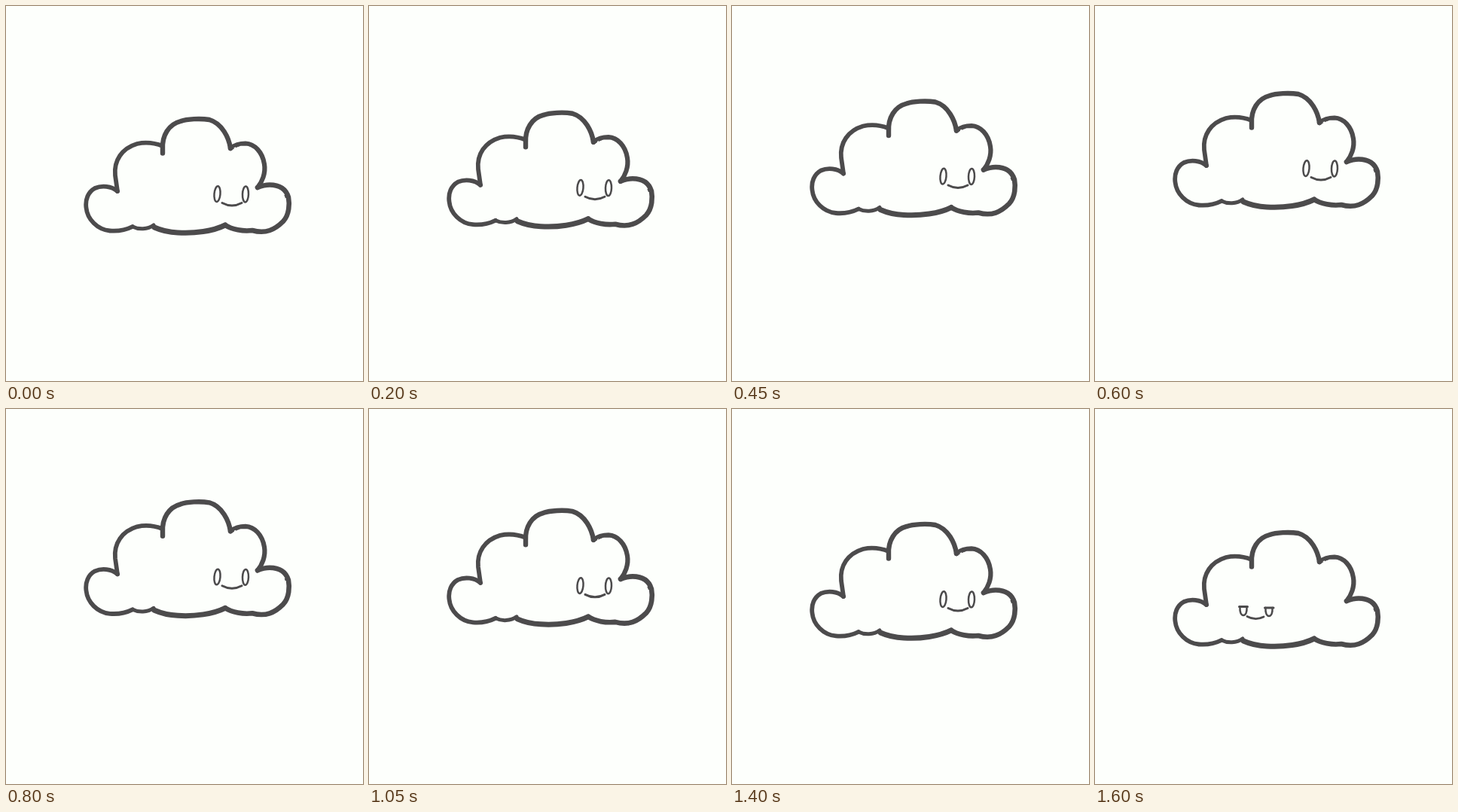
An HTML page that plays this animation: 474 px wide and 498 px high, repeating every 1.65 s.

```html
<!DOCTYPE html>
<html lang="en">
<head>
<meta charset="utf-8">
<title>Floating cloud</title>
<style>
  html, body { margin: 0; width: 100%; height: 100%; overflow: hidden; background: #fdfffc; }
  svg { display: block; width: 474px; height: 498px; }
  path, ellipse { fill: none; stroke: #4c4b4c; stroke-linecap: round; stroke-linejoin: round; }
</style>
</head>
<body>
<svg viewBox="0 0 474 498">
  <defs>
    <filter id="rough" filterUnits="userSpaceOnUse" x="90" y="135" width="305" height="185" color-interpolation-filters="sRGB">
      <feTurbulence type="fractalNoise" baseFrequency="0.12" numOctaves="1" seed="4" result="noise"/>
      <feDisplacementMap in="SourceGraphic" in2="noise" scale="1.8" xChannelSelector="R" yChannelSelector="G"/>
      <feGaussianBlur stdDeviation="0.45"/>
    </filter>
  </defs>
  <g id="cloud">
    <g filter="url(#rough)">
      <!-- left puff and the small curl below it -->
      <path stroke-width="5.8" d="M148 246 C140 239 127 238 118 242 C109 247 105 257 106.5 268 C108 283 121 297 138 298.5 C150 299.5 160 297 168 293"/>
      <path stroke-width="5" d="M168 293 C176 297 188 297 196 291"/>
      <!-- belly -->
      <path stroke-width="7" d="M197 294 C206 298 216 300.5 228 301 C250 302.5 275 299 291 291"/>
      <!-- right puff -->
      <path stroke-width="6.6" d="M291 291 C300 297 315 299.5 327 298 C345 303 357 297 368 286 C376.5 277 376.5 262 375 254 C371 241 360 237.5 350 237.5 C345 237.5 339 239 334 241"/>
      <!-- upper right, crown, upper left -->
      <path stroke-width="6.2" d="M334 241 C340 234 345 222 343 210 C340.5 194 330 183 318 182.5 C310 182.5 303 185 298 189"/>
      <path stroke-width="6.4" d="M298 189 C296 175 287 156 270 151 C258 149 240 150 232 153 C216 157 207 172 208 190 L208 195.5"/>
      <path stroke-width="5.8" d="M208 186 C198 182 185 180.5 174 183 C154 189 143 205 145 225 L148 246"/>
    </g>
    <g id="awake" stroke-width="2.5">
      <ellipse cx="280.5" cy="249.7" rx="4" ry="10.4" transform="rotate(5 280.5 249.7)"/>
      <ellipse cx="318" cy="250" rx="4" ry="10.4" transform="rotate(2 318 250)"/>
      <path stroke-width="3" d="M287 261.5 Q300 268.5 313 261.5"/>
    </g>
    <g id="sly" stroke-width="2.5">
      <path stroke-width="3" d="M191.5 248.5 H202.5 M225.5 250 H237"/>
      <path d="M192.5 249 C192 256 194 260 197 260 C200 260 202 256 201.5 249"/>
      <path d="M226.5 250 C226 257 228 261 231 261 C234 261 236 257 235.5 250"/>
      <path stroke-width="2.8" d="M202 261.5 Q213 267.5 224 262"/>
    </g>
  </g>
</svg>
<script>
  const LOOP = 1650, STEP = 50, PEAK = 600, GLANCE = 1550;
  const [cloud, awake, sly] = ['cloud', 'awake', 'sly'].map(id => document.getElementById(id));

  // Rise 34 px, then sink 48 px, each with a gentle start.
  function lift(t) {
    return t < PEAK
      ? -34 * (t / PEAK) ** 1.286
      : -34 + 48 * ((t - PEAK) / 1000) ** 1.17;
  }

  function draw(now) {
    const t = Math.floor((now % LOOP) / STEP) * STEP;
    const glancing = t >= GLANCE;
    cloud.setAttribute('transform', `translate(0 ${lift(t).toFixed(2)})`);
    awake.style.display = glancing ? 'none' : '';
    sly.style.display = glancing ? '' : 'none';
  }

  function tick() {
    draw(performance.now());
    requestAnimationFrame(tick);
  }
  tick();
</script>
</body>
</html>
```
